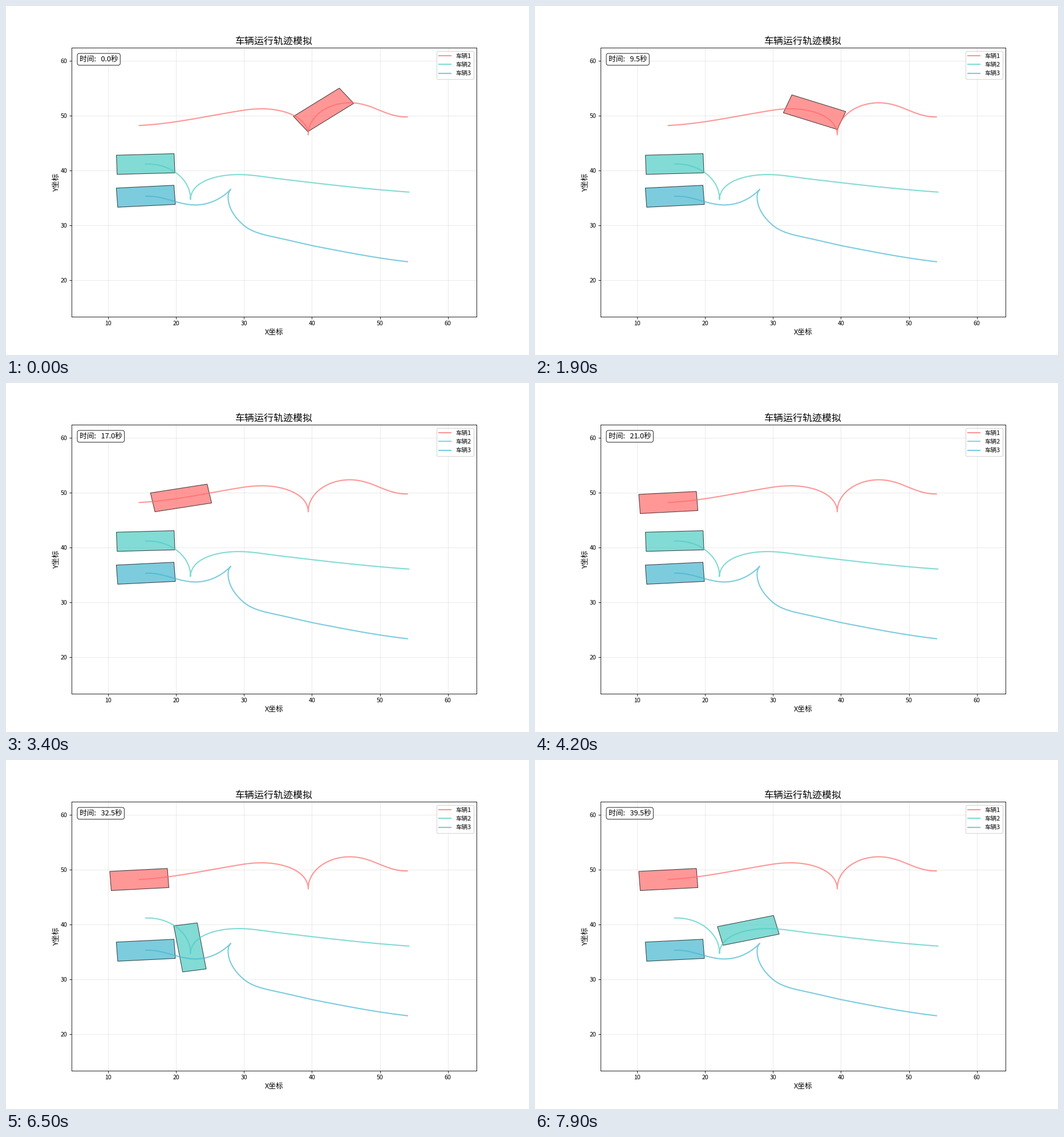
Recreate the animation shown at these times as a matplotlib script. Size 917 by 611 pixels, loop 8 s.

```python
from itertools import pairwise

import matplotlib.pyplot as plt
import numpy as np
from matplotlib.animation import FuncAnimation
from matplotlib.patches import Polygon

W, H, DPI = 917, 611, 76.4
FRAMES, INTERVAL = 80, 100
CAR = np.array([(-1, -1), (1, -1), (1, 1), (-1, 1)]) * (4.25, 1.75)
SLOW, FAST, ACCEL = 0.67, 1.34, 0.25  # units per frame, and per frame squared
BEND = 0.075  # curvature above which a car drives slowly

# Colour, frame at which the car turns round, way in, turning point, way out.
# Points: x, y, travel direction in degrees.
ROUTES = [
    ("#FF6B6B", 9.2,
     [(54.03, 49.78, 182), (49.96, 51.0, 152), (45.59, 52.36, 180)],
     (39.46, 46.52, 271),
     [(32.66, 51.26, 180), (29.86, 50.99, 191), (14.59, 48.22, 183.5)]),
    ("#4ECDC4", 68,
     [(15.52, 41.2, 2.5)],
     (22.12, 34.74, -91),
     [(29.22, 39.28, 0), (35, 38.54, -8.5), (54.25, 36.09, -5)]),
    ("#45B7D1", 200,
     [(15.55, 35.33, 4), (22.84, 33.74, 0)],
     (28.05, 36.58, 52),
     [(27.66, 35.2, 270), (30, 30, 314), (35, 27.75, 345),
      (40.5, 26.22, 346.5), (54.07, 23.4, 352)]),
]


def hermite(u, p0, p1, m0, m1):
    a = 2 * (p0 - p1) + m0 + m1
    b = 3 * (p1 - p0) - 2 * m0 - m1
    return ((a * u + b) * u + m0) * u + p0


def curve(points):
    """Smooth line through the points; near circular between two of them."""
    u = np.linspace(0, 1, 80, endpoint=False)[:, None]
    parts = []
    for (x0, y0, d0), (x1, y1, d1) in pairwise(points):
        p0, p1 = np.array([x0, y0]), np.array([x1, y1])
        a0, a1 = np.radians([d0, d1])
        size = np.hypot(*(p1 - p0)) / np.cos((a1 - a0) / 4) ** 2
        m0, m1 = (size * np.array([np.cos(a), np.sin(a)]) for a in (a0, a1))
        parts.append(hermite(u, p0, p1, m0, m1))
    return np.vstack(parts + [p1])


def drive(points):
    """Position, heading and time along one leg, from rest to rest."""
    xy = curve(points)
    steps = np.hypot(*np.diff(xy, axis=0).T)
    dist = np.r_[0, np.cumsum(steps)]
    dx, dy = np.gradient(xy, dist, axis=0).T
    angle = np.unwrap(np.arctan2(dy, dx))

    limit = np.where(abs(np.gradient(angle, dist)) > BEND, SLOW, FAST)
    limit[[0, -1]] = 0
    gap = abs(dist[:, None] - dist)
    speed = np.sqrt((limit ** 2 + 2 * ACCEL * gap).min(axis=1))
    time = np.r_[0, np.cumsum(2 * steps / (speed[1:] + speed[:-1]))]
    return xy, angle, time


def plan(turn_at, way_in, turn, way_out):
    x, y, d = turn
    xy0, a0, t0 = drive(way_in + [turn])
    xy1, a1, t1 = drive([(x, y, d + 180 if d < 180 else d - 180)] + way_out)
    return (np.vstack([xy0, xy1]), np.r_[a0, a1],
            turn_at + np.r_[t0 - t0[-1], t1])


def car_corners(track, frame):
    xy, angle, time = track
    x, y, a = (np.interp(frame, time, q) for q in (*xy.T, angle))
    turn = np.array([(np.cos(a), np.sin(a)), (-np.sin(a), np.cos(a))])
    return CAR @ turn + (x, y)


plt.rcParams["font.family"] = "Noto Sans CJK JP"
fig, ax = plt.subplots(figsize=((W + 1e-6) / DPI, (H + 1e-6) / DPI), dpi=DPI)
ax.set_title("车辆运行轨迹模拟", fontsize=16)
ax.set_xlabel("X坐标", fontsize=12)
ax.set_ylabel("Y坐标", fontsize=12, labelpad=0)
ax.grid(True, alpha=0.3)
ax.set_axisbelow(True)

cars = []
for i, (color, *route) in enumerate(ROUTES, 1):
    track = plan(*route)
    ax.plot(*track[0].T, color=color, lw=2, alpha=0.7, label=f"车辆{i}")
    car = Polygon(CAR, closed=True, fc=color, ec="black", lw=1, alpha=0.7)
    ax.add_patch(car)
    cars.append((car, track))

points = np.vstack([track[0] for _, track in cars])
low, high = points.min(axis=0) - 10, points.max(axis=0) + 10
ax.set(xlim=(low[0], high[0]), ylim=(low[1], high[1]))
ax.legend(loc="upper right")

clock = ax.text(0.02, 0.95, "", transform=ax.transAxes, fontsize=12,
                bbox=dict(boxstyle="round", facecolor="white", alpha=0.8))


def update(frame):
    for car, track in cars:
        car.set_xy(car_corners(track, frame))
    clock.set_text(f"时间:   {frame * 0.5:.1f}秒")
    return [car for car, _ in cars] + [clock]


anim = FuncAnimation(fig, update, frames=FRAMES, interval=INTERVAL,
                     repeat=True, repeat_delay=0)
plt.show()
```
